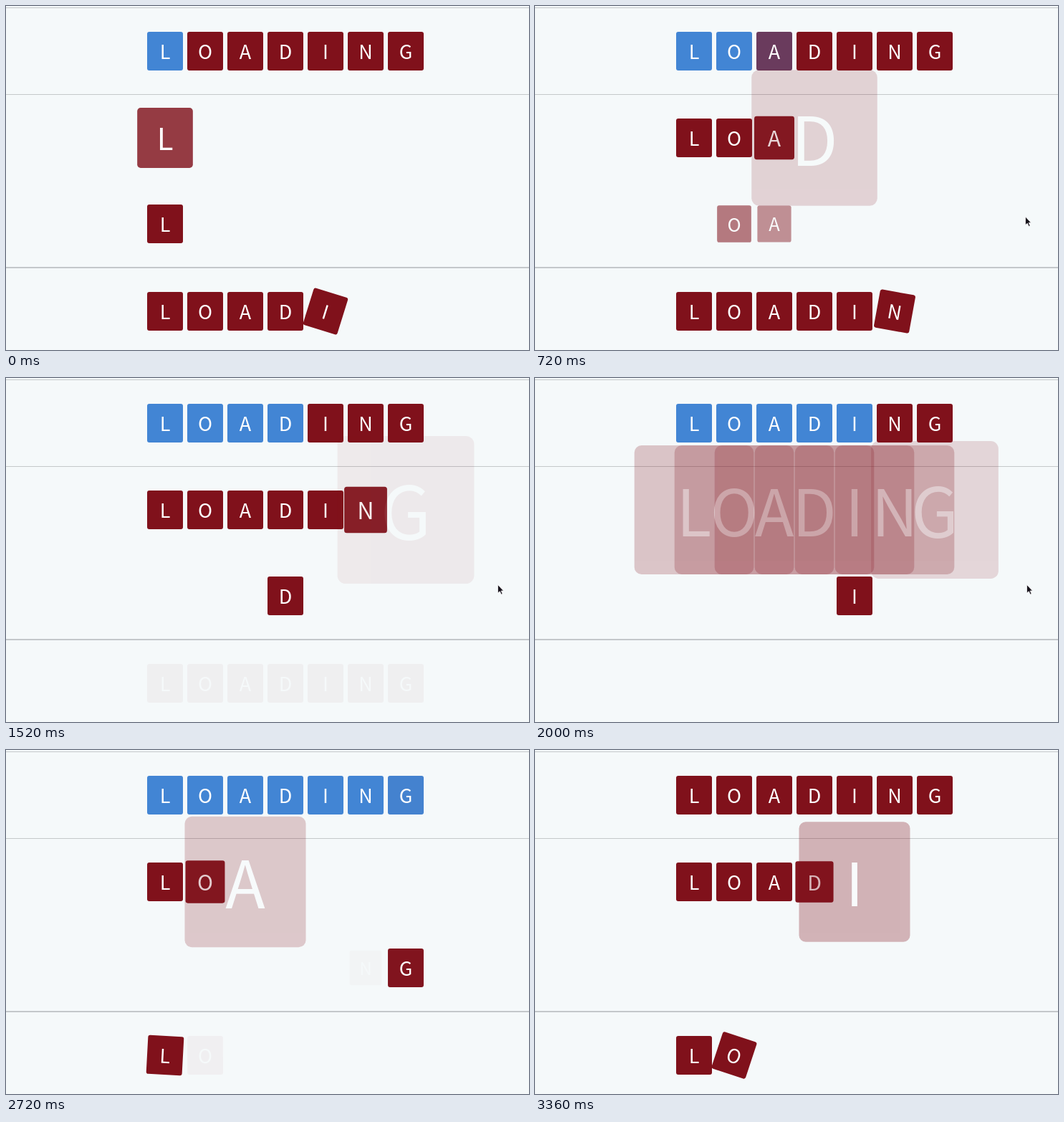
These frames come from a looping animation (730 px wide and 480 px high, 3440 ms). An HTML page:

```html
<!DOCTYPE html>
<html lang="en">
<head>
<meta charset="utf-8">
<title>Loading</title>
<style>
  html, body { margin: 0; width: 100%; height: 100%; overflow: hidden; background: #f5f9fa; }
  svg { display: block; }
  rect.card { fill: #80111b; }
  text {
    font: 500 27px "Noto Sans CJK SC", "Noto Sans CJK JP", "Noto Sans", sans-serif;
    fill: #fff;
    text-anchor: middle;
  }
</style>
</head>
<body>
<svg id="stage" width="730" height="480" viewBox="0 0 730 480">
  <g fill="#c4c8ca">
    <rect y="2" width="730" height="1"/>
    <rect y="123" width="730" height="1"/>
    <rect y="364" width="730" height="2"/>
  </g>
  <g id="rows"></g>
  <path id="cursor" d="M0 0V11.5L2.8 9.2L4.8 13.6L6.6 12.8L4.7 8.5H8Z"
        fill="#16121a" stroke="#fff" stroke-width=".7"/>
</svg>
<script>
const LOOP = 3440;
const WORD = 'LOADING';
const RED = [128, 17, 27], BLUE = [66, 133, 212];
const NS = 'http://www.w3.org/2000/svg';
const cursor = document.getElementById('cursor');

function add(parent, name, attrs) {
  const el = document.createElementNS(NS, name);
  for (const key in attrs) el.setAttribute(key, attrs[key]);
  return parent.appendChild(el);
}

function makeRow(cy) {
  return [...WORD].map((letter, i) => {
    const g = add(document.getElementById('rows'), 'g', {});
    const card = add(g, 'rect', { class: 'card', x: -25, y: -27, width: 50, height: 54, rx: 3 });
    add(g, 'text', { y: 11 }).textContent = letter;
    return { g, card, x: 222 + 56 * i, cy };
  });
}

function place(tile, opacity, scale, angle) {
  tile.g.setAttribute('opacity', opacity.toFixed(4));
  tile.g.setAttribute('transform',
    `translate(${tile.x} ${tile.cy}) rotate(${angle}) scale(${scale})`);
}

function bezier(x1, y1, x2, y2) {
  const at = (a, b, s) => 3 * (1 - s) * (1 - s) * s * a + 3 * (1 - s) * s * s * b + s * s * s;
  return x => {
    if (!(x > 0)) return 0;
    if (x >= 1) return 1;
    let lo = 0, hi = 1;
    for (let n = 0; n < 24; n++) {
      const mid = (lo + hi) / 2;
      if (at(x1, x2, mid) < x) lo = mid; else hi = mid;
    }
    return at(y1, y2, lo);
  };
}
const ease = bezier(.25, .1, .25, 1);
const easeInOut = bezier(.42, 0, .58, 1);

// Letters switch on one by one, all switch off together, then it starts over.
// A transition that turns back early takes a proportionally shorter time.
function level(row, i, c) {
  const { first, step, fade } = row;
  const on = first + step * i, off = first + step * 7, again = on + step * 8;
  const rise = t => ease((t - on) / fade);
  const fall = t => {
    const top = rise(off);
    return top * (1 - ease((t - off) / (fade * top)));
  };
  if (c < off) return rise(c);
  if (c < again) return fall(c);
  const low = fall(again);
  return low + (1 - low) * ease((c - again) / (fade * (1 - low)));
}

function spin(row, i, c) {
  const on = row.first + row.step * i, off = row.first + row.step * 7;
  const again = on + row.step * 8;
  if (c >= off && c < again) return 0;
  return 360 * (1 - easeInOut((c - (c < off ? on : again)) / 725));
}

const tint = { first: -290, step: 483, fade: 193, tiles: makeRow(63) };
const solo = { first: -298, step: 483, fade: 193, tiles: makeRow(304) };
const roll = { first: -3253, step: 667, fade: 193, tiles: makeRow(426) };
const zoom = { first: -216, step: 290, fade: 475, tiles: makeRow(184) };

tint.tiles.forEach(tile => place(tile, 1, 1, 0));

// The picture advances in uneven holds of 80 and 160 ms.
function clock(t) {
  if (t < 80) return 28;
  return Math.floor(t / 240) * 240 + (t % 240 >= 80 ? 120 : 0);
}

function drawCursor(t) {
  const shown = t >= 560 && t < 2640;
  const [x, y] = t < 720 ? [694, 297] : t < 800 ? [684.5, 294] : [686.5, 288.5];
  cursor.setAttribute('visibility', shown ? 'visible' : 'hidden');
  cursor.setAttribute('transform', `translate(${x} ${y})`);
}

function draw(t) {
  const c = clock(t);
  for (let i = 0; i < WORD.length; i++) {
    const mix = level(tint, i, c);
    const rgb = RED.map((v, n) => Math.round(v + (BLUE[n] - v) * mix));
    tint.tiles[i].card.style.fill = `rgb(${rgb})`;

    const near = level(zoom, i, c);
    place(zoom.tiles[i], near, 4 - 3 * near, 0);

    const start = solo.first + solo.step * i;
    const shown = ease((c - start) / solo.fade) - ease((c - start - solo.step) / solo.fade);
    place(solo.tiles[i], shown, .9 + .1 * shown, 0);

    place(roll.tiles[i], level(roll, i, c), 1, spin(roll, i, c));
  }
  drawCursor(t);
}

const begin = performance.now();
function tick() {
  draw((performance.now() - begin) % LOOP);
  requestAnimationFrame(tick);
}
tick();
</script>
</body>
</html>
```
